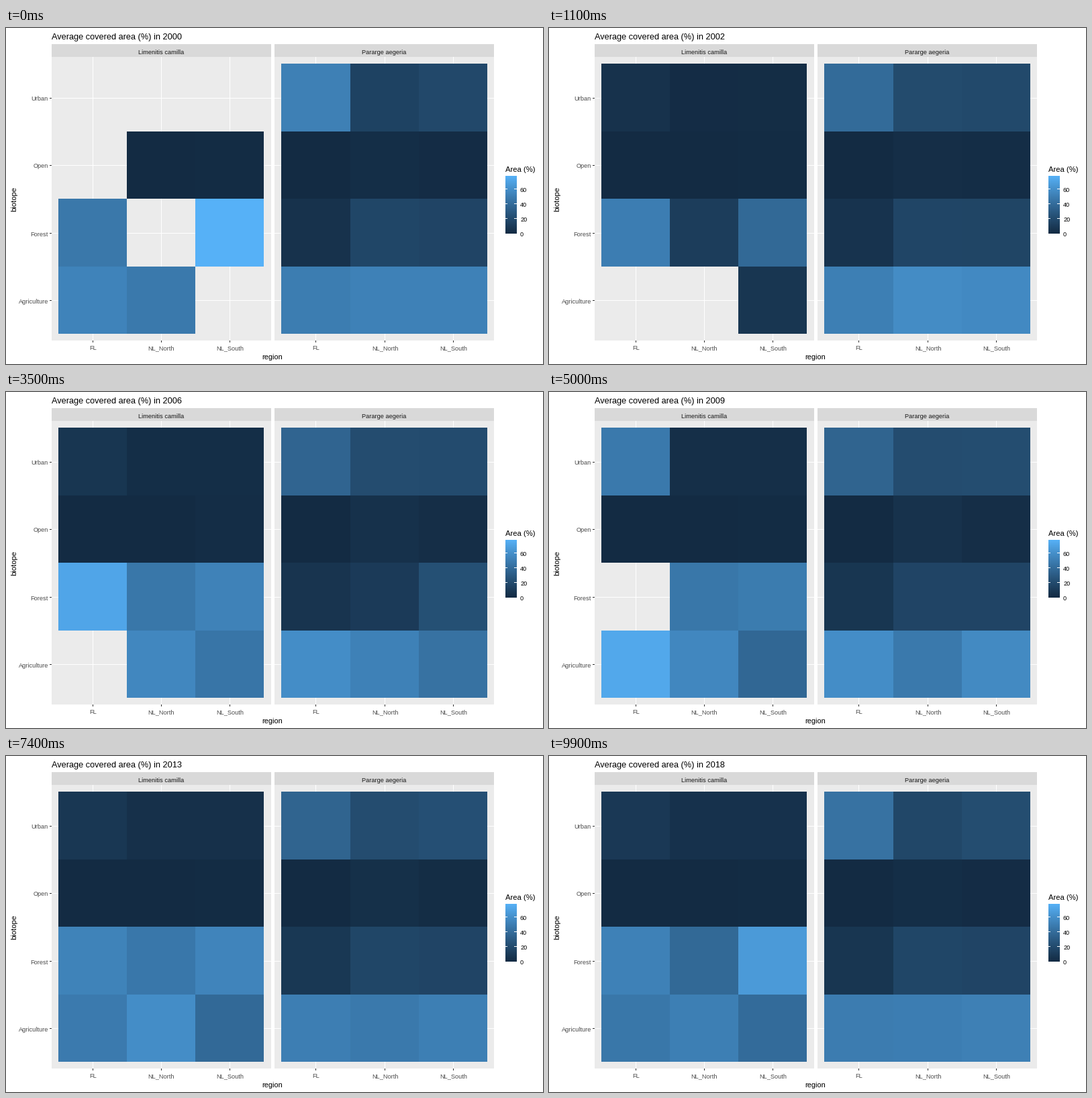
Recreate the animation shown at these times as a matplotlib script. Size 800 by 500 pixels, loop 10 s.

```python
import numpy as np
import matplotlib.pyplot as plt
from matplotlib.animation import FuncAnimation
from matplotlib.colors import ListedColormap
from matplotlib.patches import Rectangle

W, H, DPI = 800, 500, 100
FRAMES, INTERVAL = 100, 100
FIRST_YEAR, STATES = 2000, 19
BIOTOPES = ["Urban", "Open", "Forest", "Agriculture"]
REGIONS = ["FL", "NL_North", "NL_South"]
ROWS = [53, 154, 254, 355, 455]
ROW_MID = [104, 204, 305, 405]
PANELS = [
    dict(name="Limenitis camilla", x=68, cols=[78, 180, 282, 384], mid=[129, 231, 333]),
    dict(name="Pararge aegeria", x=400, cols=[410, 513, 615, 717], mid=[461, 564, 666]),
]
# Frame at which each state is reached, and the steps taken to get there
ARRIVE = [0, 5, 11, 17, 23, 29] + list(range(35, 101, 5))
STEPS = [0] + [3] * 6 + [2] * 9 + [1] * 3 + [2]

TO_XYZ = np.array([[0.4124, 0.3576, 0.1805],
                   [0.2126, 0.7152, 0.0722],
                   [0.0193, 0.1192, 0.9505]])
WHITE = TO_XYZ.sum(axis=1)


def rgb_to_lab(rgb):
    rgb = np.array(rgb) / 255
    lin = np.where(rgb > 0.04045, ((rgb + 0.055) / 1.055) ** 2.4, rgb / 12.92)
    xyz = TO_XYZ @ lin / WHITE
    f = np.where(xyz > 0.008856, np.cbrt(xyz), 7.787 * xyz + 16 / 116)
    return np.array([116 * f[1] - 16, 500 * (f[0] - f[1]), 200 * (f[1] - f[2])])


def lab_to_rgb(lab):
    fy = (lab[0] + 16) / 116
    f = np.array([fy + lab[1] / 500, fy, fy - lab[2] / 200])
    xyz = np.where(f > 0.2069, f ** 3, (f - 16 / 116) / 7.787) * WHITE
    lin = np.clip(np.linalg.solve(TO_XYZ, xyz), 0, 1)
    return np.where(lin > 0.0031308, 1.055 * lin ** (1 / 2.4) - 0.055, 12.92 * lin)


LOW, HIGH = rgb_to_lab([19, 43, 67]), rgb_to_lab([86, 177, 247])
CMAP = ListedColormap([lab_to_rgb(LOW + (HIGH - LOW) * t) for t in np.linspace(0, 1, 256)])

YEARS = np.arange(STATES)


def bump(center, width):
    return np.exp(-((YEARS - center) / width) ** 2)


def path(*points):
    """Straight lines through (year, value) key points."""
    return np.interp(YEARS, *zip(*points))


def camilla():
    """Trends in percent of the colour scale, Urban FL to Agriculture NL_South."""
    rows = [
        5 + 0.35 * YEARS + 16 * bump(4, 1) + 54 * bump(9.3, 1.8),
        1 + 0.25 * YEARS,
        1 + 0.25 * YEARS + 8 * bump(4, 1),
        0 * YEARS,
        0 * YEARS,
        1 + 2 * bump(5, 1.5),
        path((0, 60), (2, 64), (6, 92), (8, 84), (10, 53), (12, 66), (18, 73)),
        path((1, 32), (2, 15), (4, 44), (6, 59), (16, 60), (17, 49)),
        path((0, 100), (2, 49), (4, 80), (5, 69), (12, 58), (13, 69), (18, 68)),
        path((0, 68), (7, 62), (9, 94), (11, 62), (14, 62), (15, 68), (16, 50)),
        path((0, 61), (4, 83), (6, 71), (9, 71), (10, 65), (13, 65), (14, 85), (15, 70)),
        path((2, 9), (4, 72), (5, 58), (8, 58), (9, 48), (18, 51)),
    ]
    values = np.array(rows, dtype=float)
    values[[0, 1, 2, 3, 7, 11], 0] = np.nan
    values[[4, 6], 4] = np.nan
    values[6, 9] = np.nan
    values[9, 2:7] = np.nan
    values[10, 2] = np.nan
    return values


def aegeria():
    """Same order as above."""
    return np.array([
        45 + 21 * np.exp(-YEARS / 1.5),
        27 - 8 * np.exp(-YEARS),
        24 + 0.4 * YEARS,
        0 * YEARS,
        2 + 4 * bump(9, 6),
        1 + 2 * bump(7, 6),
        6 + 0.35 * YEARS,
        22 - 9 * bump(6, 2),
        21 + 13 * bump(5, 1.6),
        63 + 14 * bump(7.5, 4),
        61 + 15 * bump(3, 3),
        65 + 8 * bump(2.5, 2) - 10 * bump(6, 1) + 8 * bump(9, 1.5),
    ])


# Indexed by state, panel, tile; NaN marks a missing tile
VALUES = np.array([camilla(), aegeria()]).transpose(2, 0, 1) / 100

fig = plt.figure(figsize=(W / DPI, H / DPI), dpi=DPI, facecolor="white")
ax = fig.add_axes([0, 0, 1, 1])
ax.axis("off")


def box(x0, y0, x1, y1, color, z=1):
    patch = Rectangle((x0, y0), x1 - x0, y1 - y0, facecolor=color,
                      linewidth=0, antialiased=False, zorder=z)
    return ax.add_patch(patch)


def label(x, y, text, px, color="black", ha="left", **kw):
    return ax.text(x, y, text, fontsize=px * 72 / DPI, color=color, ha=ha,
                   va="baseline", family="Liberation Sans", zorder=5, **kw)


def draw_panel(name, x, cols, mid):
    right = x + 327
    box(x, 24, right, 43, "#D9D9D9")
    box(x, 43, right, 465, "#EBEBEB")
    label((x + right) / 2, 39, name, 9.3, "#1A1A1A", "center")
    for y in ROW_MID:
        box(x, y, right, y + 1, "white", 2)
    for cx, region in zip(mid, REGIONS):
        box(cx, 43, cx + 1, 465, "white", 2)
        box(cx, 465, cx + 1, 468, "#333333", 2)
        label(cx + 0.5, 479, region, 9.3, "#4D4D4D", "center")
    return [box(cols[c], ROWS[r], cols[c + 1], ROWS[r + 1], "black", 3)
            for r in range(4) for c in range(3)]


def draw_legend():
    label(744, 214, "Area (%)", 11.3)
    ax.imshow(np.linspace(1, 0, 256)[:, None], cmap=CMAP, extent=[744, 761, 306, 220],
              aspect="auto", interpolation="nearest", zorder=2)
    for value in (0, 20, 40, 60):
        y = 305 - 1.1 * value
        label(766, y + 5, str(value), 9.2)
        if value:
            box(744, y, 747, y + 1, "white", 3)
            box(757, y, 761, y + 1, "white", 3)


tiles = [draw_panel(**panel) for panel in PANELS]
for y, biotope in zip(ROW_MID, BIOTOPES):
    box(65, y, 68, y + 1, "#333333", 2)
    label(63, y + 4.5, biotope, 9.3, "#4D4D4D", "right")
label(397, 493, "region", 11, ha="center")
label(15, 254.5, "biotope", 11.2, ha="center", rotation=90, rotation_mode="anchor")
draw_legend()
title = label(67.7, 17, "", 12.7)
ax.set_xlim(0, W)
ax.set_ylim(H, 0)


def update(frame):
    state = max(i for i in range(STATES) if ARRIVE[i] <= frame)
    steps = STEPS[state + 1]
    t = max(0, frame - ARRIVE[state + 1] + steps) / steps
    following = (state + 1) % STATES
    now, then = VALUES[state], VALUES[following]
    # Leaving tiles stay until the next state is reached
    mixed = np.where(np.isnan(then), now, now + (then - now) * t)
    for panel, row in zip(tiles, mixed):
        for tile, value in zip(panel, row):
            shown = not np.isnan(value)
            tile.set_visible(shown)
            if shown:
                tile.set_facecolor(CMAP(float(value)))
    year = FIRST_YEAR + (following if t > 0.5 else state)
    title.set_text(f"Average covered area (%) in {year}")
    return [title]


anim = FuncAnimation(fig, update, frames=FRAMES, interval=INTERVAL,
                     init_func=lambda: update(0), repeat=True, repeat_delay=0)
plt.show()
```
